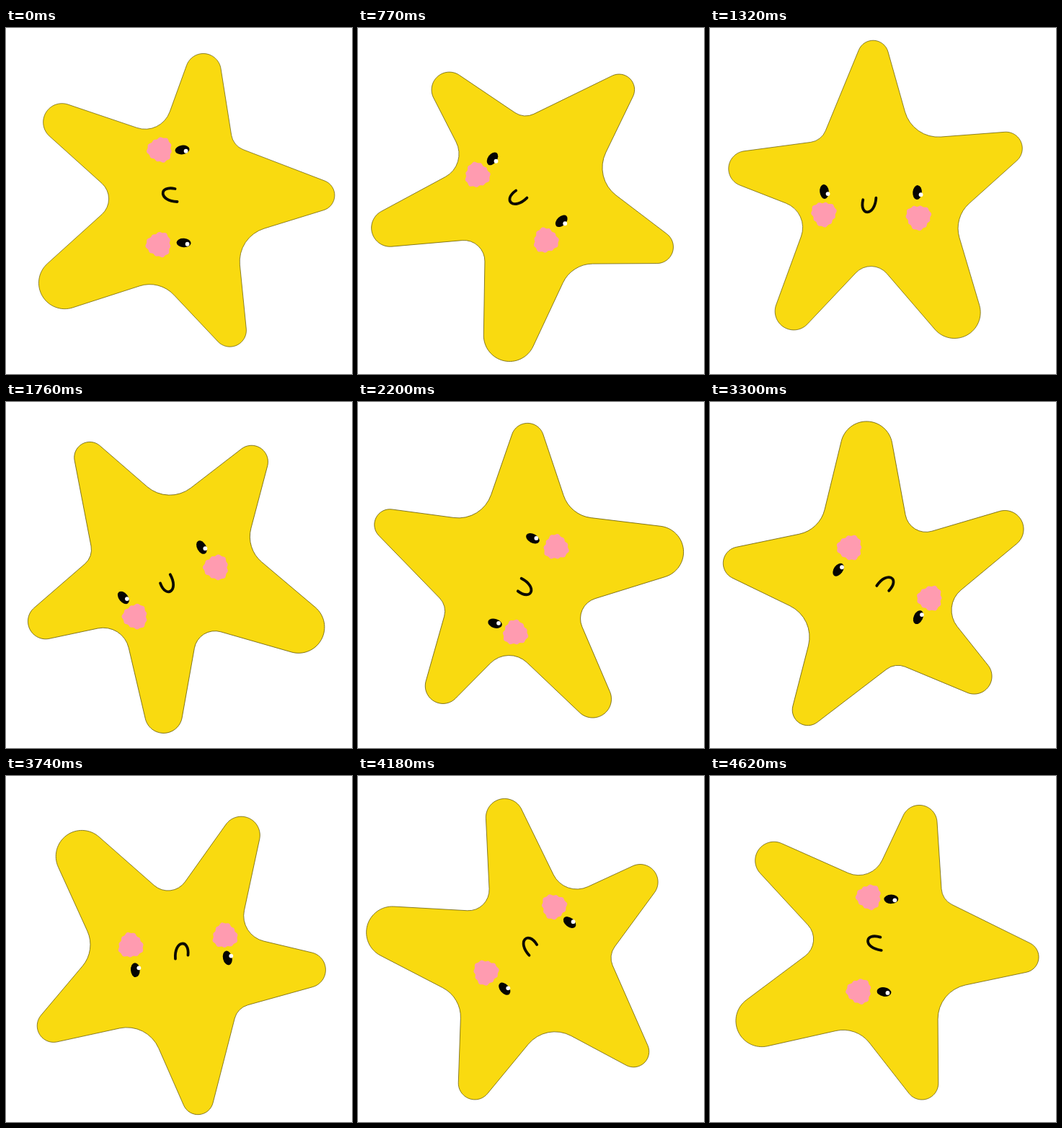
Recreate the animation shown at these times as an HTML page with a canvas. Size 480 px wide and 480 px high, loop 4730 ms.

```html
<!DOCTYPE html>
<html lang="en">
<head>
<meta charset="utf-8">
<title>Spinning star</title>
<style>
  html, body { margin: 0; width: 100%; height: 100%; overflow: hidden; background: #fff; }
  canvas { display: block; width: 100vw; height: 100vh; }
</style>
</head>
<body>
<canvas id="stage" width="480" height="480"></canvas>
<script>
const ctx = document.getElementById('stage').getContext('2d');
const { sin, cos, PI } = Math;
const STEP = 110, STEPS = 43;
const PIVOT = { x: 233, y: 245 };

// Key points of the spin: step, degrees turned
const SPIN = [[0, 0], [7, 47], [30, 238.4], [38, 314.7], [42, 354.7], [43, 360]];

// Star corners: x, y, rounding radius; tips and notches alternate
const CORNERS = [
  [281.5, -38, 24.6], [313.4, 163.3, 26],
  [498.6, 234.3, 21.5], [318.9, 289.8, 48],
  [338.4, 483.8, 22.8], [211.3, 349, 46],
  [-69, 439.6, 36], [155.3, 237, 29],
  [-35, 65.7, 26], [213.5, 149.7, 36]
];
const EYES = [{ x: 243, y: 169, tilt: -0.12 }, { x: 245, y: 298, tilt: 0.06 }];
const CHEEKS = [{ x: 212, y: 169 }, { x: 210.5, y: 300.5 }];

const body = roundedPolygon(CORNERS);
const cheek = wobblyBlob();
const mouth = new Path2D('M233 223 C210 218 210 240 236 241');

function roundedPolygon(corners) {
  const path = new Path2D();
  const [first] = corners, last = corners[corners.length - 1];
  path.moveTo((first[0] + last[0]) / 2, (first[1] + last[1]) / 2);
  corners.forEach(([x, y, radius], i) => {
    const next = corners[(i + 1) % corners.length];
    path.arcTo(x, y, next[0], next[1], radius);
  });
  path.closePath();
  return path;
}

function wobblyBlob() {
  const path = new Path2D();
  for (let t = 0; t < 2 * PI; t += PI / 36) {
    const radius = 16.8 - 1.3 * cos(3 * t) + 0.8 * sin(11 * t);
    path.lineTo(radius * cos(t), radius * sin(t));
  }
  path.closePath();
  return path;
}

function turnAt(step) {
  const i = SPIN.findIndex(key => key[0] > step);
  const [s0, d0] = SPIN[i - 1], [s1, d1] = SPIN[i];
  return (d0 + (d1 - d0) * (step - s0) / (s1 - s0)) * PI / 180;
}

function oval(x, y, rx, ry, tilt, color) {
  ctx.beginPath();
  ctx.ellipse(x, y, rx, ry, tilt, 0, 2 * PI);
  ctx.fillStyle = color;
  ctx.fill();
}

function drawEye({ x, y, tilt }, turn) {
  ctx.save();
  ctx.translate(x, y);
  oval(0, 0, 10, 6.3, tilt, '#050402');
  // The glint keeps to the right of the stage while the eye turns
  ctx.rotate(turn);
  oval(5, 3.5 * sin(turn + PI / 6), 2.9, 2.9, 0, '#fff');
  ctx.restore();
}

function drawCheek({ x, y }) {
  ctx.save();
  ctx.translate(x, y);
  ctx.fillStyle = '#ff9bb0';
  ctx.fill(cheek);
  ctx.restore();
}

function draw(step) {
  const turn = turnAt(step);
  // The spin is slightly off centre, so the star sways as it turns
  const swayX = 3 * cos(turn - 0.7) - 0.7;
  const swayY = -6.2 * sin(turn);

  ctx.fillStyle = '#fff';
  ctx.fillRect(0, 0, 480, 480);

  ctx.save();
  ctx.translate(PIVOT.x + swayX, PIVOT.y + swayY);
  ctx.rotate(-turn);
  ctx.translate(-PIVOT.x, -PIVOT.y);
  ctx.lineCap = 'round';

  ctx.fillStyle = '#f9da10';
  ctx.fill(body);
  ctx.strokeStyle = 'rgba(90, 80, 0, 0.85)';
  ctx.lineWidth = 0.8;
  ctx.stroke(body);

  CHEEKS.forEach(drawCheek);
  ctx.strokeStyle = '#0c0a02';
  ctx.lineWidth = 3.8;
  ctx.stroke(mouth);
  EYES.forEach(eye => drawEye(eye, turn));
  ctx.restore();
}

const start = performance.now();
function tick() {
  const elapsed = performance.now() - start;
  draw(Math.floor(elapsed / STEP) % STEPS);
  requestAnimationFrame(tick);
}
tick();
</script>
</body>
</html>
```
